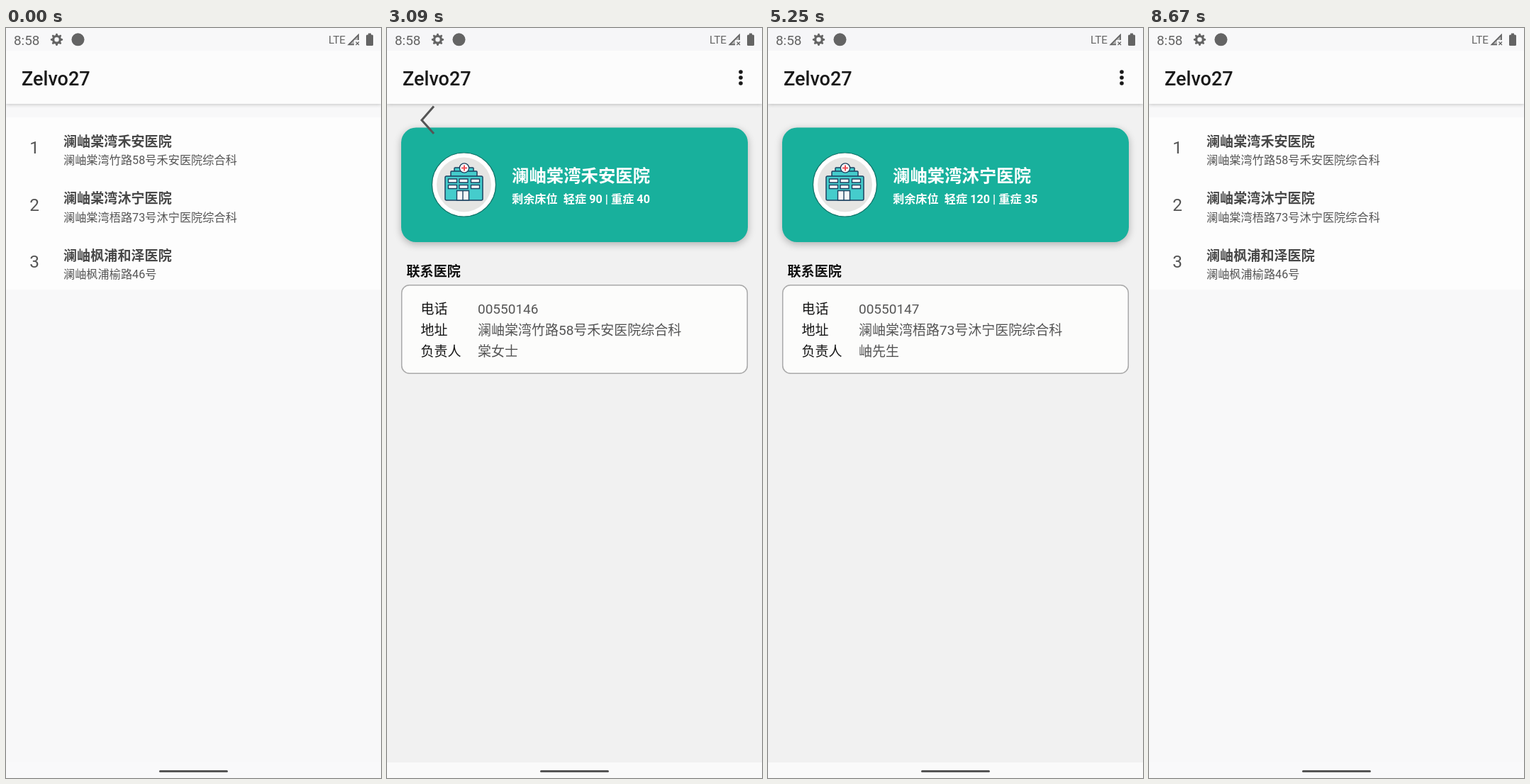
An HTML page with a canvas for the animation above (9.22 s loop, 529 by 1058 pixels).

```html
<!DOCTYPE html>
<html lang="zh-CN">
<head>
<meta charset="utf-8">
<title>Hospital list</title>
<style>
  html, body { margin: 0; width: 100%; height: 100%; overflow: hidden; background: #f8f8f9; }
  canvas { display: block; width: 100vw; height: 100vh; }
</style>
</head>
<body>
<canvas id="stage" width="529" height="1058"></canvas>
<script>
const W = 529, H = 1058, LOOP = 9220, TRANSITION = 400;
const FONT = "Roboto, 'Noto Sans CJK SC', 'Noto Sans CJK', sans-serif";
const APP = 'Zelvo27';

const hospitals = [
  { name: '澜岫棠湾禾安医院', address: '澜岫棠湾竹路58号禾安医院综合科', mild: 90, severe: 40, phone: '00550146', contact: '棠女士' },
  { name: '澜岫棠湾沐宁医院', address: '澜岫棠湾梧路73号沐宁医院综合科', mild: 120, severe: 35, phone: '00550147', contact: '岫先生' },
  { name: '澜岫枫浦和泽医院', address: '澜岫枫浦榆路46号', mild: 80, severe: 30, phone: '00550148', contact: '禾女士' }
];

// Each visit opens a detail page, then a back swipe closes it.
const visits = [
  { open: 2038, swipe: 2880, close: 3210 },
  { open: 3996, swipe: 5400, close: 5700 },
  { open: 6504, swipe: 7870, close: 8020 }
];

// Moments where the picture stands still: [start, length].
const holds = [[2090, 80], [3090, 120], [4130, 80], [6540, 210]];

const clamp = x => Math.min(1, Math.max(0, x));

function text(c, str, x, middle, size, color, weight = 400, align = 'left') {
  c.font = `${weight} ${size}px ${FONT}`;
  c.fillStyle = color;
  c.textAlign = align;
  c.fillText(str, x, middle + size * .37);
}

function rect(c, x, y, w, h, fill, radius = 0, stroke, lineWidth = 1.5) {
  c.beginPath();
  c.roundRect(x, y, w, h, radius);
  c.fillStyle = fill;
  c.fill();
  if (stroke) {
    c.strokeStyle = stroke;
    c.lineWidth = lineWidth;
    c.stroke();
  }
}

function circle(c, x, y, r, fill, stroke, lineWidth = 1.5) {
  rect(c, x - r, y - r, 2 * r, 2 * r, fill, r, stroke, lineWidth);
}

function line(c, points, color, width) {
  c.beginPath();
  points.forEach(([x, y]) => c.lineTo(x, y));
  c.strokeStyle = color;
  c.lineWidth = width;
  c.stroke();
}

function withShadow(c, alpha, blur, offset, draw) {
  c.save();
  c.shadowColor = `rgba(0,0,0,${alpha})`;
  c.shadowBlur = blur;
  c.shadowOffsetY = offset;
  draw();
  c.restore();
}

function makeScreen(background, status, navigation, drawBody) {
  const layer = document.createElement('canvas');
  layer.width = W;
  layer.height = H;
  const c = layer.getContext('2d');
  rect(c, 0, 0, W, H, background);
  rect(c, 0, 1036, W, 22, navigation);
  withShadow(c, .22, 5, 1, () => rect(c, 0, 32, W, 75, '#fcfcfc'));
  rect(c, 0, 0, W, 32, status);
  text(c, APP, 22, 71.3, 27, '#191919', 500);
  drawBody(c);
  return layer;
}

function drawList(c) {
  rect(c, 0, 126, W, 243, '#fdfdfd');
  hospitals.forEach((h, i) => {
    const y = 159.5 + i * 80.7;
    text(c, i + 1, 40, y + 8.5, 24.4, '#555', 400, 'center');
    text(c, h.name, 81, y, 19.1, '#484848', 700);
    text(c, h.address, 81, y + 26.5, 16.2, '#555');
  });
}

function drawHospitalIcon(c) {
  const navy = '#1d4260', teal = '#45cccc';
  circle(c, 108.5, 221, 45, '#fff', '#14756a', 1.2);
  circle(c, 108.5, 221, 38.5, '#e5e5e3');
  rect(c, 95, 197, 27, 8, teal, 1, navy);
  rect(c, 90, 202, 37, 8, teal, 1, navy);
  rect(c, 82, 209, 53, 34, teal, 2, navy);
  for (const y of [213, 221.5])
    for (const x of [86.5, 102, 118.5]) rect(c, x, y, 12, 5, '#fff', 0, navy, 1.4);
  rect(c, 98.5, 229.5, 17, 13.5, '#f4f6f8', 0, navy, 1.4);
  line(c, [[107, 229.5], [107, 243]], navy, 1.4);
  circle(c, 109, 197.5, 6.6, '#fff', navy, 1.4);
  line(c, [[105, 197.5], [113, 197.5]], '#ef4d56', 2);
  line(c, [[109, 193.5], [109, 201.5]], '#ef4d56', 2);
}

function drawDetail(c, h) {
  for (const y of [62, 70, 78]) circle(c, 499, y, 2.8, '#191919');
  withShadow(c, .28, 11, 3, () => rect(c, 20, 140.5, 489, 161.5, '#18b09c', 21));
  drawHospitalIcon(c);
  text(c, h.name, 176, 207.5, 24.4, '#fff', 700);
  text(c, `剩余床位  轻症 ${h.mild} | 重症 ${h.severe}`, 176, 241.5, 16.2, '#fff', 700);
  text(c, '联系医院', 27.5, 342.5, 19.1, '#111', 700);
  rect(c, 20.7, 362.7, 487.6, 124.6, '#fcfcfb', 11, '#a9a9a9');
  [['电话', h.phone], ['地址', h.address], ['负责人', h.contact]].forEach(([label, value], i) => {
    const y = 396 + i * 29.8;
    text(c, label, 47.5, y, 19, '#151515');
    text(c, value, 128, y, 19, '#555');
  });
}

function drawSignal(c, color) {
  c.beginPath();
  c.moveTo(482, 24);
  c.lineTo(498, 8);
  c.lineTo(498, 17);
  c.lineTo(491, 17);
  c.lineTo(491, 24);
  c.fillStyle = color + '70';
  c.fill();
  line(c, [[491, 23.3], [483.5, 23.3], [497, 9.8], [497, 17]], color, 1.7);
  line(c, [[493.5, 19.5], [498, 24]], color, 1.3);
  line(c, [[498, 19.5], [493.5, 24]], color, 1.3);
}

function drawSystemBar(c) {
  const gray = '#646464';
  text(c, '8:58', 11, 17, 18.9, gray);
  c.beginPath();
  for (let i = 0; i < 32; i++) {
    const r = i % 4 < 2 ? 8.7 : 6.4, a = (i - .5) * Math.PI / 16;
    c.lineTo(71.5 + r * Math.cos(a), 16.3 + r * Math.sin(a));
  }
  c.closePath();
  c.moveTo(74.7, 16.3);
  c.arc(71.5, 16.3, 3.2, 0, 7);
  c.fillStyle = gray;
  c.fill('evenodd');
  circle(c, 101.5, 16.3, 9, gray);
  text(c, 'LTE', 455, 16.7, 15.2, gray);
  drawSignal(c, gray);
  rect(c, 508, 9.5, 10, 15.5, gray, 1.5);
  rect(c, 511, 7.5, 4, 3, gray);
  rect(c, 216, 1047, 97, 3, '#555', 1.5);
}

// Fast start with a very long settling tail: two joined cubic curves.
function ease(x) {
  if (x <= 0) return 0;
  if (x >= 1) return 1;
  const [xs, ys] = x < 1 / 6
    ? [[0, .05, .1333, 1 / 6], [0, 0, .06, .4]]
    : [[1 / 6, .2083, .25, 1], [.4, .82, 1, 1]];
  const cubic = ([a, b, c, d], u) =>
    (1 - u) ** 3 * a + 3 * (1 - u) ** 2 * u * b + 3 * (1 - u) * u * u * c + u ** 3 * d;
  let low = 0, high = 1;
  for (let i = 0; i < 20; i++) {
    const mid = (low + high) / 2;
    if (cubic(xs, mid) < x) low = mid; else high = mid;
  }
  return cubic(ys, low);
}

const list = makeScreen('#f8f8f9', '#f8f8f9', '#f9f9fa', drawList);
const details = hospitals.map(h => makeScreen('#f1f1f1', '#f6f6f8', '#fafafa', c => drawDetail(c, h)));
const ctx = document.getElementById('stage').getContext('2d');

function drawScaled(layer, scale, alpha = 1) {
  ctx.globalAlpha = alpha;
  ctx.drawImage(layer, W / 2 * (1 - scale), H / 2 * (1 - scale), W * scale, H * scale);
  ctx.globalAlpha = 1;
}

function drawBackArrow(t, visit) {
  const shown = 1 - (1 - clamp((t - visit.swipe) / 150)) ** 2;
  const alpha = shown * (1 - clamp((t - visit.close) / 100));
  if (!alpha) return;
  const x = 49 - 60 * (1 - shown);
  ctx.globalAlpha = alpha;
  line(ctx, [[x + 17, 110.5], [x, 130], [x + 17, 149]], '#555', 3);
  ctx.globalAlpha = 1;
}

function render(t) {
  const hold = holds.find(([start, length]) => t >= start && t < start + length);
  if (hold) t = hold[0];
  const index = visits.findIndex(v => t >= v.open && t < v.close + TRANSITION);
  const visit = visits[index];
  let progress = 0, alpha = 0;
  if (visit) {
    const closing = t >= visit.close;
    const elapsed = t - (closing ? visit.close : visit.open);
    const eased = ease(elapsed / TRANSITION);
    progress = closing ? 1 - eased : eased;
    alpha = closing ? 1 - clamp((elapsed - 35) / 50) : clamp((elapsed - 50) / 50);
  }
  drawScaled(list, 1 + .05 * progress);
  if (visit) {
    rect(ctx, 0, 0, W, H, `rgba(0,0,0,${.24 * progress ** 2})`);
    drawScaled(details[index], .85 + .15 * progress, alpha);
    drawBackArrow(t, visit);
  }
  drawSystemBar(ctx);
}

const begin = performance.now();
function tick() {
  render((performance.now() - begin) % LOOP);
  requestAnimationFrame(tick);
}
tick();
</script>
</body>
</html>
```
